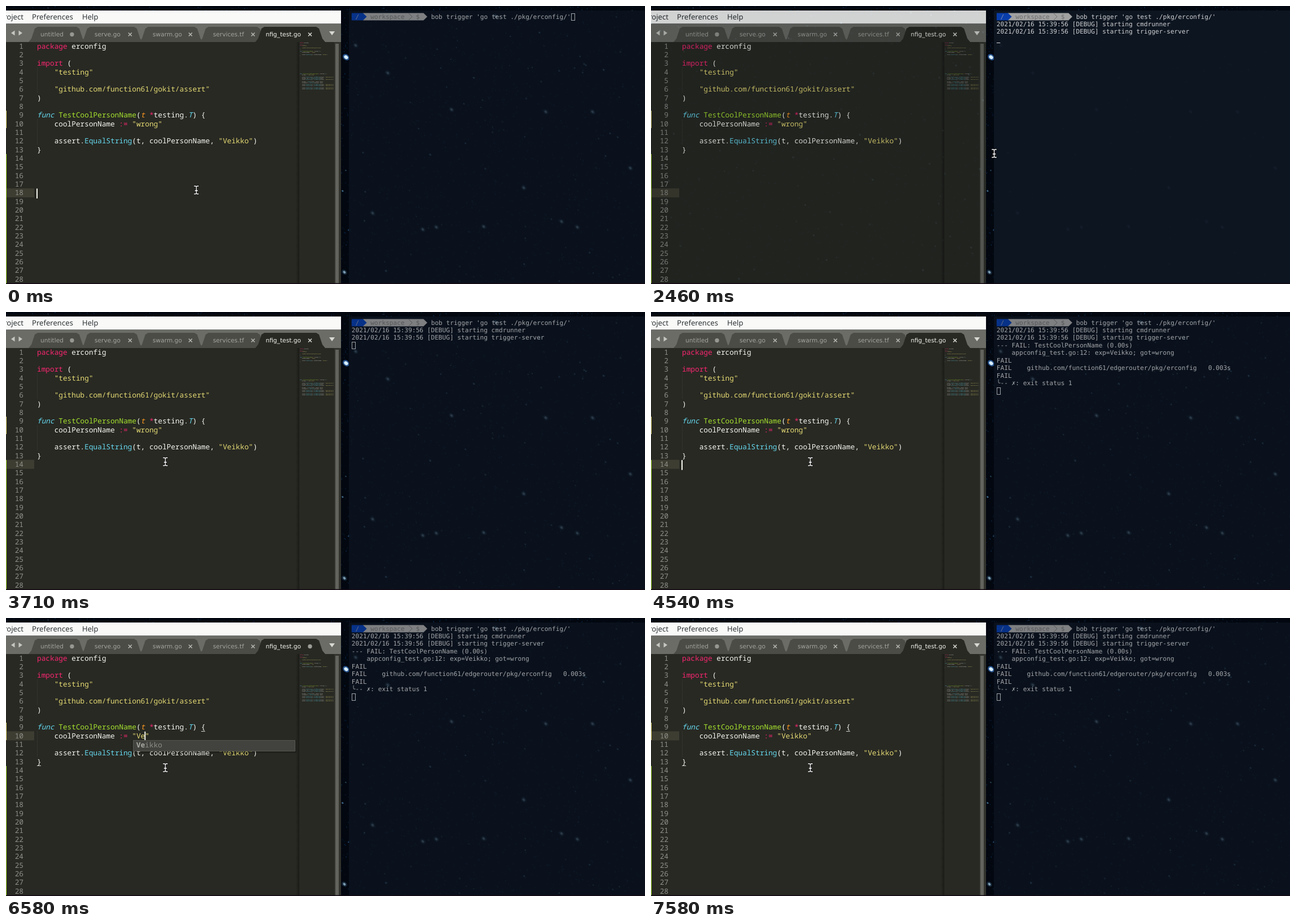
An HTML page with a canvas that plays this animation: 1133x494 px, repeating every 8000 ms.

```html
<!DOCTYPE html>
<html lang="en">
<head>
<meta charset="utf-8">
<title>Test runner beside an editor</title>
<style>
html, body { margin: 0; width: 100%; height: 100%; overflow: hidden; background: #03060f; }
canvas { display: block; }
</style>
</head>
<body>
<canvas id="stage" width="1133" height="494"></canvas>
<script>
const W = 1133, H = 494, LOOP = 8000;
const ctx = document.getElementById('stage').getContext('2d');
const NAME = 'Veikko';

const CODE = { x: 55, y: 75.6, cell: 7.66, pitch: 15.33, font: '12.77px "Noto Sans Mono", monospace' };
const TERM = { x: 612.8, y: 22.6, cell: 6.71, pitch: 13.42, font: '11.14px "DejaVu Sans Mono", monospace' };
const UI_FONT = '10.65px "DejaVu Sans", sans-serif';
const MENU_FONT = '13.1px "Noto Sans", sans-serif';

// Syntax colours; upper-case keys are italic.
const INK = { w: '#f8f8f2', r: '#f92672', y: '#e6db74', g: '#a6e22e', c: '#66d9ef', C: '#66d9ef', O: '#fd971f' };

const clamp = v => Math.max(0, Math.min(1, v));
const ramp = (t, from, to) => clamp((t - from) / (to - from));
// Last value whose start time has been reached.
const at = (t, steps) => steps.filter(s => s[0] <= t).pop()[1];

function rect(color, x, y, w, h) {
  ctx.fillStyle = color;
  ctx.fillRect(x, y, w, h);
}

function poly(color, ...points) {
  ctx.fillStyle = color;
  ctx.beginPath();
  points.forEach(([x, y]) => ctx.lineTo(x, y));
  ctx.fill();
}

function text(str, x, y, color, font, align = 'left') {
  ctx.font = font;
  ctx.fillStyle = color;
  ctx.textAlign = align;
  ctx.fillText(str, x, y);
}

function makeWallpaper() {
  const canvas = document.createElement('canvas');
  canvas.width = W;
  canvas.height = H;
  const c = canvas.getContext('2d');
  let seed = 61;
  const random = () => (seed = seed * 16807 % 2147483647) / 2147483647;
  const star = (x, y, r, color) => {
    c.fillStyle = color;
    c.beginPath();
    c.ellipse(x, y, r * 1.3, r, 0.7, 0, 7);
    c.fill();
  };
  c.fillStyle = '#03070f';
  c.fillRect(0, 0, W, H);
  for (let i = 0; i < 9000; i++) {
    star(random() * W, random() * H, 0.4 + random() * 0.6, `rgba(20,90,160,${random() * 0.4})`);
  }
  for (let i = 0; i < 230; i++) {
    star(random() * W, random() * H, 0.7 + random() * 0.9, `rgba(90,150,190,${0.2 + random() * 0.5})`);
  }
  const bright = [[677, 119], [957, 188], [985, 383], [1040, 188], [918, 323], [1107, 288], [763, 393],
    [847, 392], [739, 397], [650, 368], [868, 18], [620, 70], [790, 184], [1013, 393], [600, 473]];
  for (const [x, y] of bright) {
    star(x, y, 4, 'rgba(70,120,160,.3)');
    star(x, y, 2, 'rgba(150,185,205,.8)');
  }
  star(603, 91, 5, 'rgba(60,130,220,.6)');
  star(603, 91, 3, '#d8efff');
  return canvas;
}
const wallpaper = makeWallpaper();

// Lets the wallpaper show through a window that is already drawn.
function showThrough(alpha, x, y, w, h) {
  ctx.globalAlpha = alpha;
  ctx.drawImage(wallpaper, x, y, w, h, x, y, w, h);
  ctx.globalAlpha = 1;
}

const source = value => ({
  1: 'rpackage|w erconfig',
  3: 'rimport|w (',
  4: 'y    "testing"',
  6: 'y    "github.com/function61/gokit/assert"',
  7: 'w)',
  9: 'Cfunc|g TestCoolPersonName|w(|Ot|r *|wtesting.|CT|w) {',
  10: `w    coolPersonName|r :=|y "${value}"`,
  12: `w    assert.|cEqualString|w(t, coolPersonName, |y"${NAME}"|w)`,
  13: 'w}'
});

const equal = 'w    assert.|cEqualString|w(t, |cbuildMessage|w(input), |y"expected text"|w)';
const offscreenSource = {
  30: 'Cfunc|g TestFormattingOfErrorMessages|w(|Ot|r *|wtesting.|CT|w) {',
  31: 'w    message := |y"some value"',
  33: equal, 34: 'w    message, err := |cloadConfiguration|w(input)',
  35: equal, 37: 'w    message := |cformat|w(first, second, third)',
  38: 'w    configured := |cnewConfig|w(message, input)',
  40: equal, 41: equal, 43: equal, 44: equal
};

function drawCode(lines) {
  for (const [number, line] of Object.entries(lines)) {
    let column = 0;
    for (const part of line.split('|')) {
      const italic = /[A-Z]/.test(part[0]) ? 'italic ' : '';
      text(part.slice(1), CODE.x + column * CODE.cell, CODE.y + (number - 1) * CODE.pitch,
        INK[part[0]], italic + CODE.font);
      column += part.length - 1;
    }
  }
}

const lineTop = line => 63.4 + (line - 1) * CODE.pitch;
const columnX = column => CODE.x + column * CODE.cell;

function cross(x, y, color) {
  ctx.strokeStyle = color;
  ctx.lineWidth = 1.6;
  ctx.beginPath();
  ctx.moveTo(x - 3, y - 3); ctx.lineTo(x + 3, y + 3);
  ctx.moveTo(x + 3, y - 3); ctx.lineTo(x - 3, y + 3);
  ctx.stroke();
}

function dot(x, y, color) {
  ctx.fillStyle = color;
  ctx.beginPath();
  ctx.arc(x, y, 3.7, 0, 7);
  ctx.fill();
}

function tabShape(left, right, color) {
  poly(color, [left, 64], [left + 5, 58], [left + 11, 40], [left + 16, 37],
    [right - 16, 37], [right - 11, 40], [right - 5, 58], [right, 64]);
}

function drawChrome(dirty) {
  rect('#f9f9f8', 0, 8, 594, 23.5);
  text('Project', 31, 24, '#2e3436', MENU_FONT, 'right');
  text('Preferences', 46, 24, '#2e3436', MENU_FONT);
  text('Help', 135, 24, '#2e3436', MENU_FONT);

  rect('#6b6c66', 0, 31.5, 594, 32.5);
  const tabs = [['untitled', 61, 40, 141], ['serve.go', 157, 133, 243],
    ['swarm.go', 260, 236, 350], ['services.tf', 367, 343, 461]];
  for (const [label, x, left, right] of tabs) {
    tabShape(left, right, '#4b4c46');
    text(label, x, 54, '#a3a49e', UI_FONT);
    if (label === 'untitled') dot(117, 50.5, '#969791');
    else cross(right - 23, 50.5, '#b5b6b0');
  }
  tabShape(442, 566, '#282923');
  ctx.save();
  ctx.beginPath();
  ctx.rect(460, 34, 100, 30);
  ctx.clip();
  text('appconfig_test.go', 523, 54, '#f5f5f0', UI_FONT, 'right');
  ctx.restore();
  if (dirty) dot(539, 50.5, '#9c9d97');
  else cross(539, 50.5, '#d5d6d0');
  poly('#c6c7c1', [9, 48], [15.5, 43.5], [15.5, 52.5]);
  poly('#c6c7c1', [29, 48], [22.5, 43.5], [22.5, 52.5]);
  poly('#d8d9d3', [573, 45], [583, 45], [578, 52]);
}

function drawPopup(typed) {
  rect('rgba(0,0,0,.2)', 223, 217, 292, 23);
  rect('#42433e', 225, 217, 288, 20);
  ctx.strokeStyle = '#55564f';
  ctx.lineWidth = 1;
  ctx.strokeRect(225.5, 217.5, 287, 19);
  [...NAME].forEach((letter, i) => text(letter, 231 + i * CODE.cell, 230.3,
    i < typed ? '#a9aaa4' : '#8c8d87', (i < typed ? 'bold ' : '') + CODE.font));
}

function caretPosition(t, value) {
  if (t >= 6250) return [10, 23 + value.length];
  return at(t, [[0, [18, 0]], [3040, [14, 0]], [4670, [13, 0]], [4790, [12, 0]], [4920, [11, 0]],
    [5080, [10, 0]], [5330, [10, 29]], [5540, [10, 28]], [5790, [10, 23]]]);
}

// Opacity of the caret: held, faded out, hidden, faded in.
function caretOpacity(t) {
  if (t < 2710) return 1 - ramp(t, 290, 500);
  if (t < 4670) return 1 - ramp(t, 3340, 3700) + ramp(t, 3920, 4290);
  return 1 - ramp(t, 7290, 7570);
}

function drawEditor(t) {
  const typed = at(t, [[0, 0], [6250, 1], [6460, 2], [6670, 3], [6790, 4], [6880, 5], [7000, 6]]);
  const value = typed ? NAME.slice(0, typed) : 'wrong';
  const selecting = t >= 5790 && t < 6250;
  const [line, column] = caretPosition(t, value);
  const lines = source(value);

  rect('#282923', 0, 64, 594, 430);
  drawChrome(t >= 6250 && t < 7210);
  rect('#3e3d32', 0, lineTop(line), 50, 16);
  for (let n = 1; n <= 28; n++) {
    text(n, 31, CODE.y + (n - 1) * CODE.pitch, '#8f908a', CODE.font, 'right');
  }
  rect('#e6db74', 0, 186, 1, 31);
  rect('#a6e22e', 0, 263, 1, 231);

  ctx.fillStyle = '#3d3e37';
  for (const first of [4, 10]) {
    for (let y = lineTop(first); y < lineTop(first + 3); y += 2) ctx.fillRect(55, Math.round(y), 1, 1);
  }

  if (selecting) rect('#56564a', columnX(23), lineTop(10), 5 * CODE.cell, 16);
  drawCode(lines);
  if (t >= 4670 && !selecting) {
    rect('#d5d5cc', columnX(38), 201, 7, 1);
    rect('#d5d5cc', columnX(0), 262, 7, 1);
  }

  // The minimap is the same text at one eighth of its size.
  const shade = ctx.createLinearGradient(514, 0, 520, 0);
  shade.addColorStop(0, 'rgba(0,0,0,0)');
  shade.addColorStop(1, 'rgba(0,0,0,.35)');
  rect(shade, 514, 64, 6, 430);
  ctx.save();
  ctx.translate(514.1, 56.3);
  ctx.scale(1 / 8, 1 / 8);
  if (selecting) rect('#77776a', columnX(23), lineTop(10), 5 * CODE.cell, 16);
  drawCode({ ...lines, ...offscreenSource });
  ctx.restore();
  rect('#32332d', 582, 64, 12, 430);
  rect('#62635d', 584, 67, 6, 427);

  ctx.globalAlpha = caretOpacity(t);
  rect('#f8f8f0', columnX(column) - 1, lineTop(line) + 0.4, 2, 17.6);
  ctx.globalAlpha = 1;
  if (t >= 6330 && t < 7080) drawPopup(typed);
}

const termX = column => TERM.x + column * TERM.cell;

function drawPrompt() {
  const top = 12.5, middle = 19, bottom = 25.5;
  poly('#a8a8a8', [termX(3), top], [termX(19), top], [termX(20), middle], [termX(19), bottom], [termX(3), bottom]);
  poly('#0a40b0', [termX(0), top], [termX(3), top], [termX(4), middle], [termX(3), bottom], [termX(0), bottom]);
  text(' /', termX(0), TERM.y, '#8794b4', TERM.font);
  text('workspace', termX(5), TERM.y, '#737373', TERM.font);
  text('$', termX(17), TERM.y, '#737373', TERM.font);
  ctx.strokeStyle = '#737373';
  ctx.lineWidth = 1;
  ctx.beginPath();
  ctx.moveTo(termX(15), top);
  ctx.lineTo(termX(16), middle);
  ctx.lineTo(termX(15), bottom);
  ctx.stroke();
}

const STARTED = ['2021/02/16 15:39:56 [DEBUG] starting cmdrunner',
  '2021/02/16 15:39:56 [DEBUG] starting trigger-server'];
const FAILED = ['--- FAIL: TestCoolPersonName (0.00s)',
  `    appconfig_test.go:12: exp=${NAME}; got=wrong`,
  'FAIL',
  'FAIL    github.com/function61/edgerouter/pkg/erconfig   0.003s',
  'FAIL',
  '╰-- ✗: exit status 1'];

function drawTerminal(t, focused) {
  rect('#0e1622', 608, 8, 525, 485);
  drawPrompt();
  text("bob trigger 'go test ./pkg/erconfig/'", termX(21), TERM.y, '#d9dbdc', TERM.font);
  const output = [...(t >= 2040 ? STARTED : []), ...(t >= 4330 ? FAILED : [])];
  output.forEach((row, i) => text(row, termX(0), TERM.y + (i + 1) * TERM.pitch, '#d9dbdc', TERM.font));

  const x = termX(t < 2000 ? 58 : 0);
  const y = t < 2000 ? 0 : (output.length + 1) * TERM.pitch;
  if (!focused) {
    ctx.strokeStyle = '#d9dbdc';
    ctx.lineWidth = 1;
    ctx.strokeRect(Math.round(x) + 0.5, Math.round(y + 13) + 0.5, 6, 12);
  } else if (t < 1040 || t >= 1710) {
    rect('#e4e6e6', x, Math.round(y + 25), 6.5, 1);
  }
}

const MOUSE = [[0, 337, 327], [290, 337, 327], [540, 600, 318], [880, 700, 310], [1040, 747, 296],
  [2380, 747, 296], [2460, 608, 262], [2709, 608, 262], [2710, 282, 266], [LOOP, 282, 266]];

function drawMouse(t) {
  const next = MOUSE.findIndex(key => key[0] > t);
  const [t0, x0, y0] = MOUSE[next - 1], [t1, x1, y1] = MOUSE[next];
  const k = ramp(t, t0, t1);
  ctx.save();
  ctx.translate(Math.round(x0 + (x1 - x0) * k) + 0.5, Math.round(y0 + (y1 - y0) * k));
  const beam = new Path2D('M-3.5-7H-2Q0-7 0-5Q0-7 2-7H3.5M0-5V5M-3.5 7H-2Q0 7 0 5Q0 7 2 7H3.5M-2 1H2');
  ctx.lineCap = 'square';
  ctx.strokeStyle = '#111';
  ctx.lineWidth = 3;
  ctx.stroke(beam);
  ctx.strokeStyle = '#fff';
  ctx.lineWidth = 1.3;
  ctx.stroke(beam);
  ctx.restore();
}

function draw(t) {
  const editorFocus = t < 2710 ? 1 - ramp(t, 500, 680) : 1;
  ctx.textRendering = 'geometricPrecision';
  ctx.drawImage(wallpaper, 0, 0);
  drawEditor(t);
  showThrough(0.16 * (1 - editorFocus), 0, 8, 594, 485);
  drawTerminal(t, t >= 500 && t < 2710);
  showThrough(0.04 + 0.21 * editorFocus, 608, 8, 525, 485);
  rect('#130b14', 0, 492.5, W, 1.5);
  drawMouse(t);
}

function frame(now) {
  draw(now % LOOP);
  requestAnimationFrame(frame);
}
requestAnimationFrame(frame);
</script>
</body>
</html>
```
